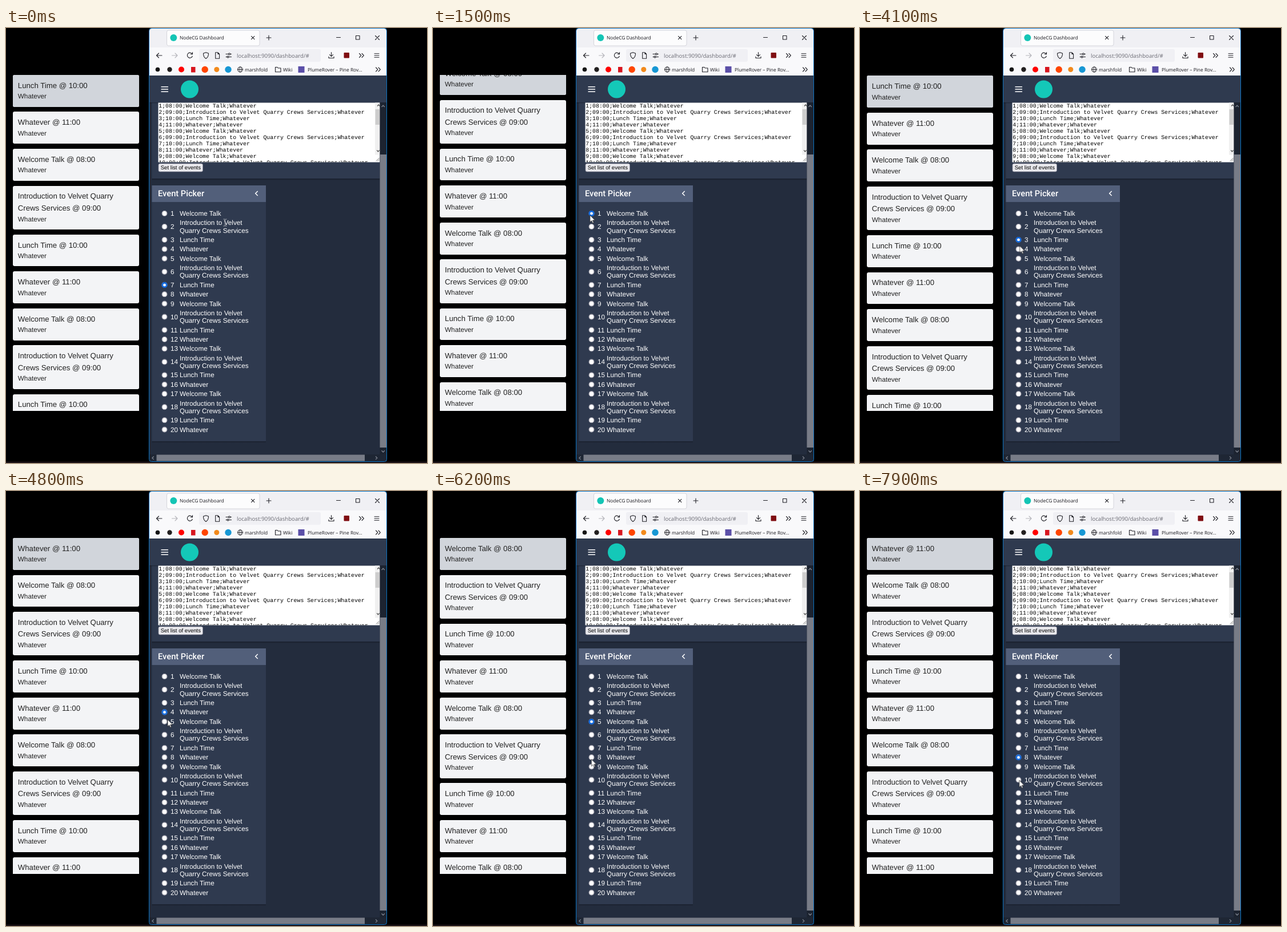
Recreate the animation shown at these times as an HTML page. Size 737x760 px, loop 8 s.

```html
<!DOCTYPE html>
<html lang="en">
<head>
<meta charset="utf-8">
<title>Event list dashboard</title>
<style>
  html, body { margin: 0; width: 100%; height: 100%; overflow: hidden; background: #000; }
  body { position: relative; text-rendering: geometricPrecision; }
  svg { position: absolute; left: 0; top: 0; display: block; }
  .sans { font-family: "Liberation Sans", Arial, sans-serif; }
  .ui { font-family: "Open Sans", "Noto Sans", sans-serif; }
  .mono { font-family: "Liberation Mono", "Courier New", monospace; white-space: pre; }

  /* schedule list */
  #view { position: absolute; left: 12px; top: 82px; width: 221px; height: 587px; overflow: hidden; }
  #list { position: absolute; left: 0; width: 221px; animation: scroll 8s infinite ease-in-out; }
  .card { box-sizing: border-box; padding: 8.8px; margin-bottom: 8.85px; border-radius: 3px;
    background: #f3f4f6; color: #222; white-space: nowrap; }
  .card div { position: relative; z-index: 2; }
  .title { font-size: 13.2px; line-height: 20.55px; }
  .place { font-size: 11.74px; line-height: 17.6px; }
  #active { position: absolute; z-index: 1; left: 0; width: 221px; border-radius: 3px;
    background: #d1d5db; animation: active 8s infinite step-end; }

  @keyframes scroll {
    0%, 14.51% { top: -428.7px; }
    19.55%, 30.46% { top: 0; }
    32.41%, 49.21% { top: -64.6px; }
    51.46%, 57.96% { top: -149.75px; }
    59.91%, 69.69% { top: -214.35px; }
    71.64%, 82% { top: -278.95px; }
    85.56%, 100% { top: -493.3px; }
  }
  @keyframes active {
    0% { top: 428.7px; height: 55.75px; }
    14.51% { top: 0; height: 55.75px; }
    30.46% { top: 64.6px; height: 76.3px; }
    49.21% { top: 149.75px; height: 55.75px; }
    57.96% { top: 214.35px; height: 55.75px; }
    69.69% { top: 278.95px; height: 55.75px; }
    82%, 100% { top: 493.3px; height: 55.75px; }
  }

  /* picked radio button */
  #picked { animation: pick 8s infinite step-end; }
  @keyframes pick {
    0% { transform: translate(277.5px, 449px); }
    12.45% { transform: translate(277.5px, 324px); }
    28.7% { transform: translate(277.5px, 347px); }
    47.45% { transform: translate(277.5px, 370px); }
    56.2% { transform: translate(277.5px, 386.4px); }
    67.45% { transform: translate(277.5px, 403px); }
    79.95%, 100% { transform: translate(277.5px, 465.4px); }
  }

  /* pointer */
  #pointer { animation: move 8s infinite linear; }
  #beam { animation: beam 8s infinite step-end; }
  #arrow { animation: arrow 8s infinite step-end; }
  @keyframes beam { 0% { opacity: 1; } 3.6%, 100% { opacity: 0; } }
  @keyframes arrow { 0% { opacity: 0; } 3.6%, 100% { opacity: 1; } }
  @keyframes move {
    0%, .8% { transform: translate(383.5px, 340px); }
    5%, 6.3% { transform: translate(268px, 330px); }
    8.75%, 18.8% { transform: translate(274.8px, 327px); }
    21.25% { transform: translate(276px, 339px); }
    25%, 33.75% { transform: translate(278px, 349px); }
    36.25% { transform: translate(278px, 356.5px); }
    40%, 41.3% { transform: translate(278.7px, 362px); }
    42.5%, 45% { transform: translate(279px, 363.6px); }
    47.5% { transform: translate(279px, 366px); }
    51.25% { transform: translate(279.6px, 380.5px); }
    53.75%, 55% { transform: translate(279.4px, 381.5px); }
    60% { transform: translate(283px, 399.3px); }
    66.25% { transform: translate(282.8px, 403px); }
    68.75% { transform: translate(286px, 406px); }
    73.75% { transform: translate(281px, 442px); }
    77.5%, 88.75% { transform: translate(277.3px, 468.5px); }
    92.5%, 96.3% { transform: translate(279px, 505.3px); }
    98.75%, 100% { transform: translate(278.8px, 505.3px); }
  }
</style>
</head>
<body>
<div id="view" class="sans"><div id="list"><div id="active"></div></div></div>

<svg width="737" height="760" viewBox="0 0 737 760">
  <defs>
    <linearGradient id="shade" x2="0" y2="1">
      <stop stop-color="#10151f" stop-opacity=".55"/>
      <stop offset="1" stop-color="#10151f" stop-opacity="0"/>
    </linearGradient>
    <clipPath id="area"><rect x="267" y="131" width="379" height="103.5"/></clipPath>
  </defs>

  <rect y="757.5" width="737" height="2.5" fill="#1a1115"/>

  <!-- browser window -->
  <rect x="250.5" y=".5" width="416" height="756.500" rx="4" fill="#232c3d"/>
  <path d="M251 35V5q0-4 4-4h407q4 0 4 4v30z" fill="#f0f0f4"/>
  <rect x="251" y="34" width="415.5" height="49" fill="#f9f9fb"/>
  <rect x="281.500" y="4" width="162.500" height="27" rx="3" fill="#fcfcfd" stroke="#c9c9d0" stroke-width=".7"/>
  <circle cx="293.300" cy="17" r="6" fill="#14c5b5"/>
  <rect x="338" y="37" width="213" height="22" rx="3" fill="#f0f0f4"/>

  <g fill="none" stroke="#222228" stroke-width="1.1" stroke-linecap="round" stroke-linejoin="round">
    <path d="M429.500 14.300l5.400 5.400m0-5.400l-5.400 5.400M456 17h8m-4-4v8"/>
    <path d="M578.500 16.500h7M612.500 13.500h6.500v6.500h-6.500zM646.500 13.500l7 7m0-7l-7 7"/>
    <path d="M273 48h-9.500m4-4l-4 4 4 4"/>
    <path d="M290.500 48h9.500m-4-4l4 4-4 4" stroke="#b4b4ba"/>
    <path d="M326 45.500a4.600 4.600 0 1 0 .3 3.800M326.500 42.500v3.300h-3.300"/>
    <path d="M350 42.700l4.500 1.600q.2 6.500-4.500 9.200-4.700-2.700-4.500-9.200z"/>
    <path d="M366.700 42.800h4.300l2.600 2.600v7.800h-6.900zM371 43v2.500h2.500"/>
    <path d="M385 45.500h4.500m3 0h2M385 50.500h2m3 0h4.500"/>
    <circle cx="391" cy="45.500" r="1.500"/><circle cx="388.500" cy="50.500" r="1.500"/>
    <path d="M569.500 42.500v7m-3-2.800l3 3 3-3M565 50v2.500h9V50"/>
    <path d="M618.500 44.500l3.300 3.500-3.300 3.500m4.500-7l3.300 3.500-3.300 3.500"/>
    <path d="M645 44.800h8m-8 3.200h8m-8 3.200h8"/>
    <path d="M647.500 69l3.300 3.500-3.300 3.500m4.500-7l3.300 3.500-3.300 3.500"/>
    <path d="M471.500 76.800v-8.300h3.500l1.300 1.500h4.700v6.800z"/>
    <g stroke-width=".9">
      <circle cx="410" cy="72.500" r="4.600"/><ellipse cx="410" cy="72.500" rx="2" ry="4.600"/>
      <path d="M405.500 72.500h9"/>
    </g>
  </g>

  <rect x="591.500" y="43" width="9.500" height="9.500" rx="1" fill="#800d12"/>
  <circle cx="265.500" cy="72.500" r="3.800" fill="#151515"/>
  <circle cx="286.500" cy="72.500" r="4.200" fill="#221f1f"/>
  <circle cx="307" cy="72.500" r="5" fill="#f00"/>
  <rect x="324" y="68" width="7.500" height="9.500" fill="#d8161f"/>
  <circle cx="348.200" cy="72.500" r="5.700" fill="#ff4500"/>
  <circle cx="368.800" cy="72.500" r="4.500" fill="#f28a1c"/>
  <circle cx="389" cy="72.500" r="5.700" fill="#1797d4"/>
  <rect x="511.500" y="67" width="11" height="11" fill="#5b4fa8"/>

  <g class="ui" font-size="8.4" fill="#15141a">
    <text x="304" y="20">NodeCG Dashboard</text>
    <text x="404" y="51.600" font-size="9.650" fill="#6b6b74">localhost:9090/dashboard/#</text>
    <text x="418" y="75.600">marshfold</text>
    <text x="485" y="75.600">Wiki</text>
    <text x="528" y="75.600">PlumeRover – Pine Rov...</text>
  </g>

  <!-- page -->
  <rect x="251" y="83" width="415.500" height="47" fill="#2f3a4f"/>
  <path d="M271.500 102.700h12.500m-12.500 4.300h12.500m-12.500 4.300h12.500" stroke="#fff" stroke-width="1.500"/>
  <circle cx="321.500" cy="107" r="15.500" fill="#14c8b8"/>

  <rect x="255.500" y="130" width="399" height="133" fill="#2f3a4f"/>
  <rect x="255.500" y="263" width="399" height="3.500" fill="url(#shade)"/>
  <rect x="251" y="130" width="404" height="2" fill="url(#shade)"/>
  <rect x="266.500" y="130.500" width="388" height="104" fill="#fff"/>
  <rect x="646" y="130.500" width="8.500" height="91" fill="#f0f0f0"/>
  <rect x="646.500" y="142" width="8" height="27" fill="#cdcdcd"/>
  <g fill="none" stroke="#505050" stroke-width="1.200">
    <path d="M650 136.500l2.200-2.500 2.200 2.500M649.200 213.500l2.200 2.500 2.200-2.500"/>
    <path d="M648 232.500l5.500-5.500m-2.700 5.500l2.700-2.700" stroke-width=".8"/>
  </g>
  <g id="lines" class="mono" font-size="9.850" fill="#000" clip-path="url(#area)"></g>
  <rect x="267" y="237" width="77.500" height="14" rx="2.500" fill="#e9e9ed" stroke="#8f8f9d" stroke-width=".8"/>
  <text class="sans" x="270.700" y="247.300" font-size="9.600">Set list of events</text>

  <rect x="255.500" y="722" width="199.500" height="3" fill="url(#shade)"/>
  <rect x="255.500" y="275" width="199.500" height="447" fill="#2f3a4f"/>
  <rect x="255.500" y="275" width="199.500" height="29" fill="#525f7a"/>
  <text x="266" y="294.300" font-family="Roboto, sans-serif" font-weight="500" font-size="14.670" fill="#fff">Event Picker</text>
  <path d="M440.700 285l-4 4 4 4" fill="none" stroke="#fff" stroke-width="1.500"/>
  <g id="rows" class="sans" font-size="11.740" fill="#fff"></g>

  <!-- scroll bars -->
  <rect x="654.500" y="130" width="12" height="615" fill="#1c2330"/>
  <rect x="654.500" y="221" width="12" height="512" fill="#787c87"/>
  <rect x="251" y="745" width="415.500" height="12" fill="#1e2634"/>
  <rect x="263.500" y="745.500" width="364.500" height="11" fill="#787c87"/>
  <g fill="none" stroke="#7d828e" stroke-width="1.300">
    <path d="M657.500 138l2.700-2.800 2.700 2.800M657.500 738.200l2.700 2.800 2.700-2.800"/>
    <path d="M258.700 748.500l-2.800 2.700 2.800 2.700M647 748.500l2.800 2.700-2.800 2.700"/>
  </g>
  <rect x="250.500" y=".5" width="416" height="757" rx="4" fill="none" stroke="#0a74c4"/>

  <g id="picked">
    <circle r="5" fill="#0060df"/><circle r="2.500" fill="#fff"/>
  </g>
  <g id="pointer">
    <path id="beam" d="M-3-6h2.200L0-5.200.8-6H3M0-5.200V5.200M-3 6h2.200L0 5.200.8 6H3" fill="none" stroke="#a9adb5" stroke-width="1"/>
    <path id="arrow" d="M0 0V12.300L2.800 9.700 4.600 13.900 6.500 13.100 4.700 9H8.700Z" fill="#fff" stroke="#111" stroke-width=".7"/>
  </g>
</svg>

<script>
  const talks = [
    { time: "08:00", name: ["Welcome Talk"] },
    { time: "09:00", name: ["Introduction to Velvet", "Quarry Crews Services"] },
    { time: "10:00", name: ["Lunch Time"] },
    { time: "11:00", name: ["Whatever"] }
  ];
  const events = Array.from({ length: 20 }, (_, i) => ({ id: i + 1, ...talks[i % 4] }));
  const add = (id, html) => document.getElementById(id).insertAdjacentHTML("beforeend", html);
  const label = (x, y, s) => `<text x="${x}" y="${Math.round(y)}">${s}</text>`;

  let rowTop = 315.8;
  for (const { id, time, name } of events) {
    // The wide cards break one word later than the picker does.
    const title = name.join(" ").replace(" Crews", "<br>Crews");
    add("list", `<div class="card"><div class="title">${title} @ ${time}</div><div class="place">Whatever</div></div>`);

    const height = 3.2 + 13.2 * name.length;
    const mid = rowTop + height / 2;
    const first = mid + 4 - 6.6 * (name.length - 1);
    add("rows",
      `<circle cx="277.5" cy="${mid.toFixed(1)}" r="4.5" stroke="#8f8f9d" stroke-width="1.2"/>` +
      label(288, mid + 4, id) +
      name.map((s, i) => label(304, first + 13.2 * i, s)).join(""));
    rowTop += height;

    if (id <= 10) add("lines", label(267.3, 128 + 11 * id, `${id};${time};${name.join(" ")};Whatever`));
  }
</script>
</body>
</html>
```
